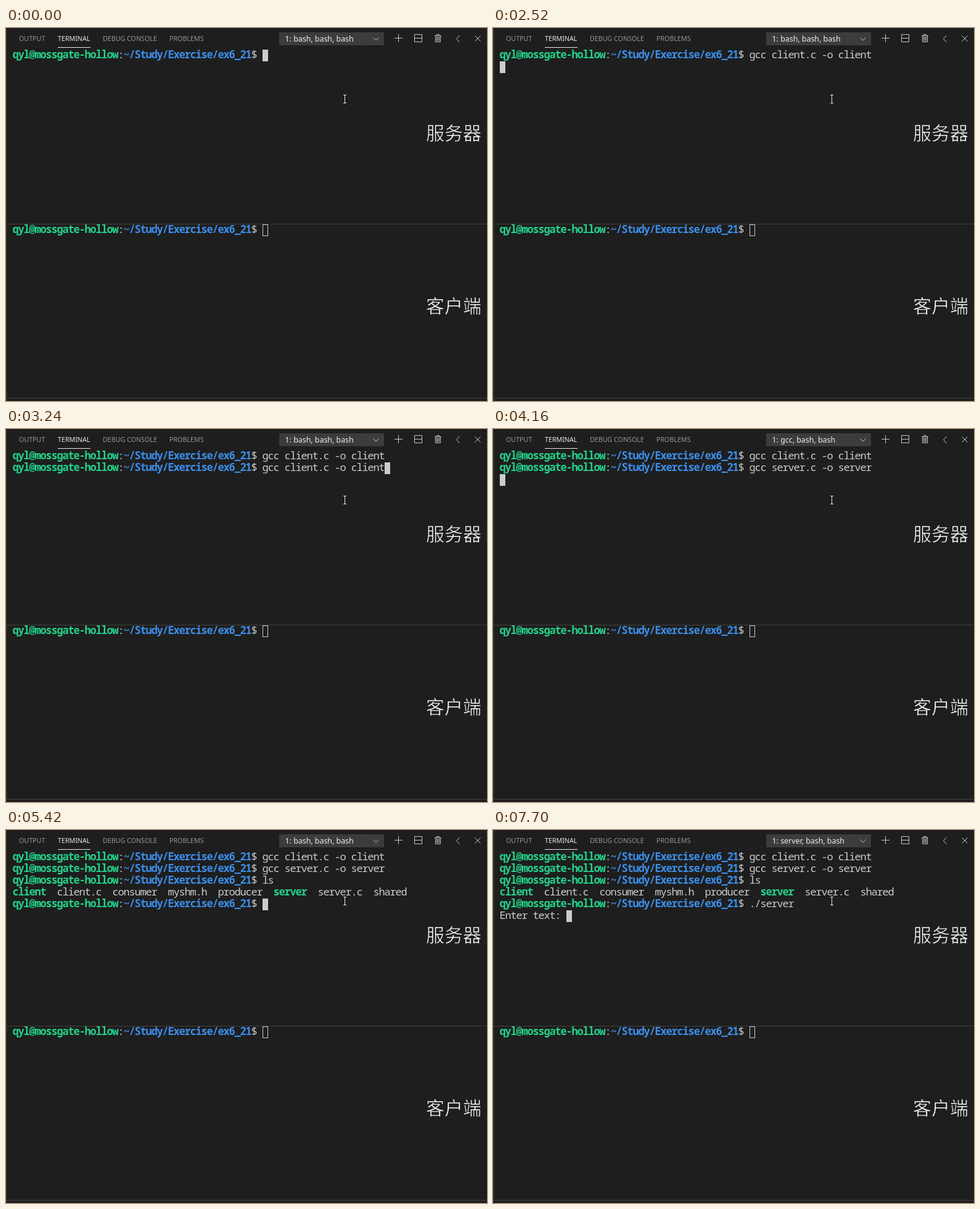
Animation of 780x604 px, one loop 8000 ms. Source, as an HTML page:

```html
<!DOCTYPE html>
<html lang="en">
<head>
<meta charset="utf-8">
<title>Terminal session</title>
<style>
  html, body { margin: 0; width: 100%; height: 100%; overflow: hidden; background: #1e1e1e; }
  svg { display: block; }
  text { white-space: pre; }
  .term { font: 17px "Noto Sans Mono", monospace; letter-spacing: -1.2px; fill: #ccc; }
  .user, .path { font-weight: 700; }
  .user { fill: #23d18b; }
  .path { fill: #3b8eea; }
  .tabs { font: 10.7px "Noto Sans", "Open Sans", sans-serif; fill: #969696; }
  .tabs .on { fill: #e7e7e7; }
  #shell { font: 12.4px "Noto Sans", "Open Sans", sans-serif; fill: #f0f0f0; }
  /* the background-coloured stroke thins the glyphs */
  .label { font: 30px "Noto Sans CJK SC", "Noto Sans CJK", "Noto Sans CJK JP", sans-serif; fill: #fff; stroke: #1e1e1e; stroke-width: .6; }
  .icons { fill: none; stroke: #c5c5c5; }
</style>
</head>
<body>
<svg width="780" height="604" viewBox="0 0 780 604">
  <path d="M.5 0V604M1 317.5H780M1 599.5H780" stroke="#414141"/>
  <g class="tabs">
    <text x="21" y="21">OUTPUT</text>
    <text x="84" y="21" class="on">TERMINAL</text>
    <text x="157" y="21">DEBUG CONSOLE</text>
    <text x="265" y="21">PROBLEMS</text>
  </g>
  <path d="M84 31.5H137" stroke="#e7e7e7"/>
  <rect x="443" y="7" width="170" height="21" fill="#3c3c3c"/>
  <text id="shell" x="452.5" y="22"></text>
  <g class="icons">
    <path d="M595.5 15.5L600 20L604.5 15.5"/>
    <path d="M630 16.5H643M636.5 10V23"/>
    <path d="M662.5 10.5H674.5V22.5H662.5ZM662 16.5H675"/>
    <path d="M695 12.5H706M698.5 12V10.5H702.5V12M696.5 13V22.5H704.5V13M698.5 14V21M700.5 14V21M702.5 14V21"/>
    <path d="M735.5 12L730.5 17.5L735.5 23"/>
    <path d="M760.5 12.5L769.5 21.5M769.5 12.5L760.5 21.5"/>
  </g>
  <g id="screen" class="term"></g>
  <rect id="cursor" width="9" height="19" fill="#ccc"/>
  <g id="client" class="term"></g>
  <rect x="416.5" y="318.5" width="8" height="18" fill="none" stroke="#ccc"/>
  <text x="681" y="181" class="label">服务器</text>
  <text x="681" y="461" class="label">客户端</text>
  <g fill="none">
    <path d="M547 108.5H552M549.5 108V122M547 121.5H552" stroke="#111" stroke-width="3"/>
    <path d="M547 108.5H552M549.5 108V122M547 121.5H552" stroke="#fff"/>
  </g>
</svg>
<script>
const $ = id => document.getElementById(id);
const span = (cls, s) => `<tspan class="${cls}">${s}</tspan>`;
const prompt = span('user', 'qyl@mossgate-hollow') + ':' + span('path', '~/Study/Exercise/ex6_21');
const promptCols = 43, cell = 9, row = 19, loop = 8000;

// Rows that begin with "$" get the prompt; the cursor follows the last row.
const client = '$ gcc client.c -o client', server = '$ gcc server.c -o server';
const files = [span('user', 'client'), 'client.c', 'consumer', 'myshm.h', 'producer',
  span('user', 'server'), 'server.c', 'shared'].join('  ');
const built = [client, server], listed = [...built, '$ ls', files], run = [...listed, '$ ./server'];

const steps = [
  [0, 'bash', ['$ ']],
  [1390, 'bash', ['$ clear']],
  [1850, 'bash', [client]],
  [2520, 'bash', [client, '']],
  [2590, 'gcc', [client, '']],
  [2650, 'gcc', [client, '$ ']],
  [2750, 'bash', [client, '$ ']],
  [2900, 'bash', [client, client]],
  [3030, 'bash', [client, '$ clear']],
  [3240, 'bash', [client, client]],
  [3730, 'bash', built],
  [4120, 'bash', [...built, '']],
  [4160, 'gcc', [...built, '']],
  [4240, 'gcc', [...built, '$ ']],
  [4340, 'bash', [...built, '$ ']],
  [5210, 'bash', [...built, '$ l']],
  [5290, 'bash', [...built, '$ ls']],
  [5420, 'bash', [...listed, '$ ']],
  [6830, 'bash', [...listed, '$ .']],
  [6900, 'bash', [...listed, '$ ./']],
  [7000, 'bash', [...listed, '$ ./s']],
  [7110, 'bash', [...listed, '$ ./server ']],
  [7600, 'bash', [...run, 'Enter text: ']],
  [7700, 'server', [...run, 'Enter text: ']]
];

const line = (s, i, top) =>
  `<text x="10.4" y="${top + i * row + 14}">${s[0] === '$' ? prompt : ''}${s}</text>`;

function show([, shell, rows]) {
  const last = rows[rows.length - 1];
  const col = last.length + (last[0] === '$' ? promptCols : 0);
  $('shell').textContent = `1: ${shell}, bash, bash`;
  $('screen').innerHTML = rows.map((s, i) => line(s, i, 35)).join('');
  $('cursor').setAttribute('x', 11 + col * cell);
  $('cursor').setAttribute('y', 35 + (rows.length - 1) * row);
}

$('client').innerHTML = line('$ ', 0, 318);

let shown, start;
function tick(now) {
  start ??= now;
  const t = (now - start) % loop;
  const step = steps.findLast(s => s[0] <= t);
  if (step !== shown) show(shown = step);
  requestAnimationFrame(tick);
}
show(shown = steps[0]);
requestAnimationFrame(tick);
</script>
</body>
</html>
```
